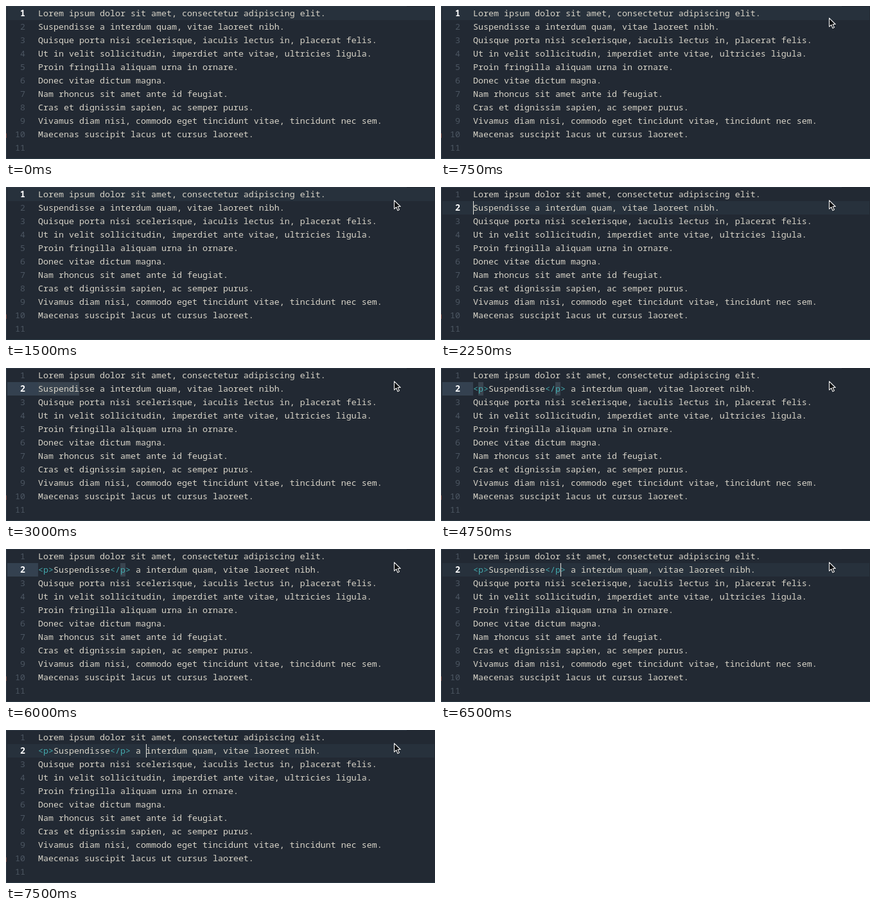
Recreate the animation shown at these times as an HTML page. Size 668 by 239 pixels, loop 8 s.

```html
<!DOCTYPE html>
<html lang="en">
<head>
<meta charset="utf-8">
<title>Editor: wrap selection in a tag</title>
<style>
  html, body { margin: 0; width: 100%; height: 100%; overflow: hidden; background: #222933; }
  svg { display: block; width: 668px; height: 239px; }
  text {
    font: 500 13.333px "Noto Sans Mono", "DejaVu Sans Mono", monospace;
    font-variant-ligatures: none;
    white-space: pre;
    fill: #d8d4c8;
  }
  .num { fill: #4b5561; font-weight: 400; text-anchor: end; }
  .num.on { fill: #fff; font-weight: 700; }
  .tag { fill: #43a9ad; }
</style>
</head>
<body>
<svg viewBox="0 0 668 239">
  <rect width="668" height="239" fill="#222933"/>
  <rect width="624" height="1" fill="#2d3843"/>
  <rect width="1" height="239" fill="#2f3b46"/>
  <rect y="238" width="668" height="1" fill="#2b3a45"/>
  <rect y="199" width="1" height="7" fill="#80504a"/>
  <g id="bands" shape-rendering="crispEdges"></g>
  <g id="lines"></g>
  <rect id="caret" width="1" height="21" fill="#e8e6df" shape-rendering="crispEdges"/>
  <g id="mouse">
    <path d="M1.5 2 V16 L4.8 13 L7.2 18.4 L9.6 17.3 L7.3 12.2 H11.5 Z" fill="#000" opacity=".25"/>
    <path d="M.5 .8 V14.3 L3.7 11.4 L6 16.7 L8.4 15.6 L6.1 10.5 H10.2 Z"
          fill="#0b0d10" stroke="#f4f4f4" stroke-width="1.1" stroke-linejoin="round"/>
  </g>
</svg>
<script>
const LOOP = 8000, LEFT = 50, CHAR = 8, ROW = 21;
const LINES = [
  "Lorem ipsum dolor sit amet, consectetur adipiscing elit.",
  "Suspendisse a interdum quam, vitae laoreet nibh.",
  "Quisque porta nisi scelerisque, iaculis lectus in, placerat felis.",
  "Ut in velit sollicitudin, imperdiet ante vitae, ultricies ligula.",
  "Proin fringilla aliquam urna in ornare.",
  "Donec vitae dictum magna.",
  "Nam rhoncus sit amet ante id feugiat.",
  "Cras et dignissim sapien, ac semper purus.",
  "Vivamus diam nisi, commodo eget tincidunt vitae, tincidunt nec sem.",
  "Maecenas suscipit lacus ut cursus laoreet.",
  ""
];

// Each step changes only the listed parts; columns count characters.
const STEPS = [
  { at: 0, row: 0, caret: null, sel: [], mouse: null, wrapped: false },
  { at: 250, caret: 0 },
  { at: 750, caret: null, mouse: [604, 18] },
  { at: 1000, caret: 0, mouse: [604, 20] },
  { at: 1500, caret: null },
  { at: 1750, row: 1, caret: 0 },
  { at: 2000, caret: 1 },
  { at: 2250, caret: 0 },
  { at: 2500, caret: null, sel: [[0, 1]] },
  { at: 3000, sel: [[0, 8]] },
  { at: 3250, sel: [[0, 13]] },
  { at: 3750, sel: [[0, 11]] },
  { at: 4750, wrapped: true, sel: [[1, 2], [16, 17]] },
  { at: 6000, sel: [[16, 17]] },
  { at: 6500, sel: [], caret: 17 },
  { at: 6750, caret: 18 },
  { at: 7000, caret: 23 },
  { at: 7250, caret: 22 },
  { at: 7500, caret: 21 }
];
let last = {};
const STATES = STEPS.map(step => last = { ...last, ...step });

const $ = id => document.getElementById(id);

function add(parent, name, attrs, content = "") {
  const el = document.createElementNS("http://www.w3.org/2000/svg", name);
  for (const key in attrs) el.setAttribute(key, attrs[key]);
  el.textContent = content;
  parent.append(el);
  return el;
}

const rowTop = row => 1 + row * ROW;
const colX = col => LEFT + col * CHAR;

const rows = LINES.map((line, i) => {
  const y = rowTop(i) + 15;
  return {
    num: add($("lines"), "text", { class: "num", x: 30, y }, i + 1),
    text: add($("lines"), "text", { x: LEFT, y }, line)
  };
});

function setWrapped(wrapped) {
  const el = rows[1].text, line = LINES[1];
  el.textContent = wrapped ? "" : line;
  if (!wrapped) return;
  add(el, "tspan", { class: "tag" }, "<p>");
  add(el, "tspan", {}, line.slice(0, 11));
  add(el, "tspan", { class: "tag" }, "</p>");
  add(el, "tspan", {}, line.slice(11));
}

function band(row, x, width, fill) {
  add($("bands"), "rect", { x, y: rowTop(row), width, height: ROW, fill });
}

function show({ row, caret, sel, mouse, wrapped }) {
  $("bands").textContent = "";
  if (sel.length) {
    band(row, 2, LEFT - 2, "#344150");
    for (const [a, b] of sel) band(row, colX(a), (b - a) * CHAR, "#39444f");
  } else {
    band(row, 2, 665, "#27313c");
  }
  rows.forEach((r, i) => r.num.classList.toggle("on", i === row));
  setWrapped(wrapped);

  $("caret").style.display = caret === null ? "none" : "";
  $("caret").setAttribute("x", colX(caret ?? 0));
  $("caret").setAttribute("y", rowTop(row));

  $("mouse").style.display = mouse ? "" : "none";
  if (mouse) $("mouse").setAttribute("transform", `translate(${mouse})`);
}

let shown;
function tick() {
  const t = performance.now() % LOOP;
  const state = STATES.findLast(s => s.at <= t);
  if (state !== shown) show(shown = state);
  requestAnimationFrame(tick);
}
tick();
</script>
</body>
</html>
```
